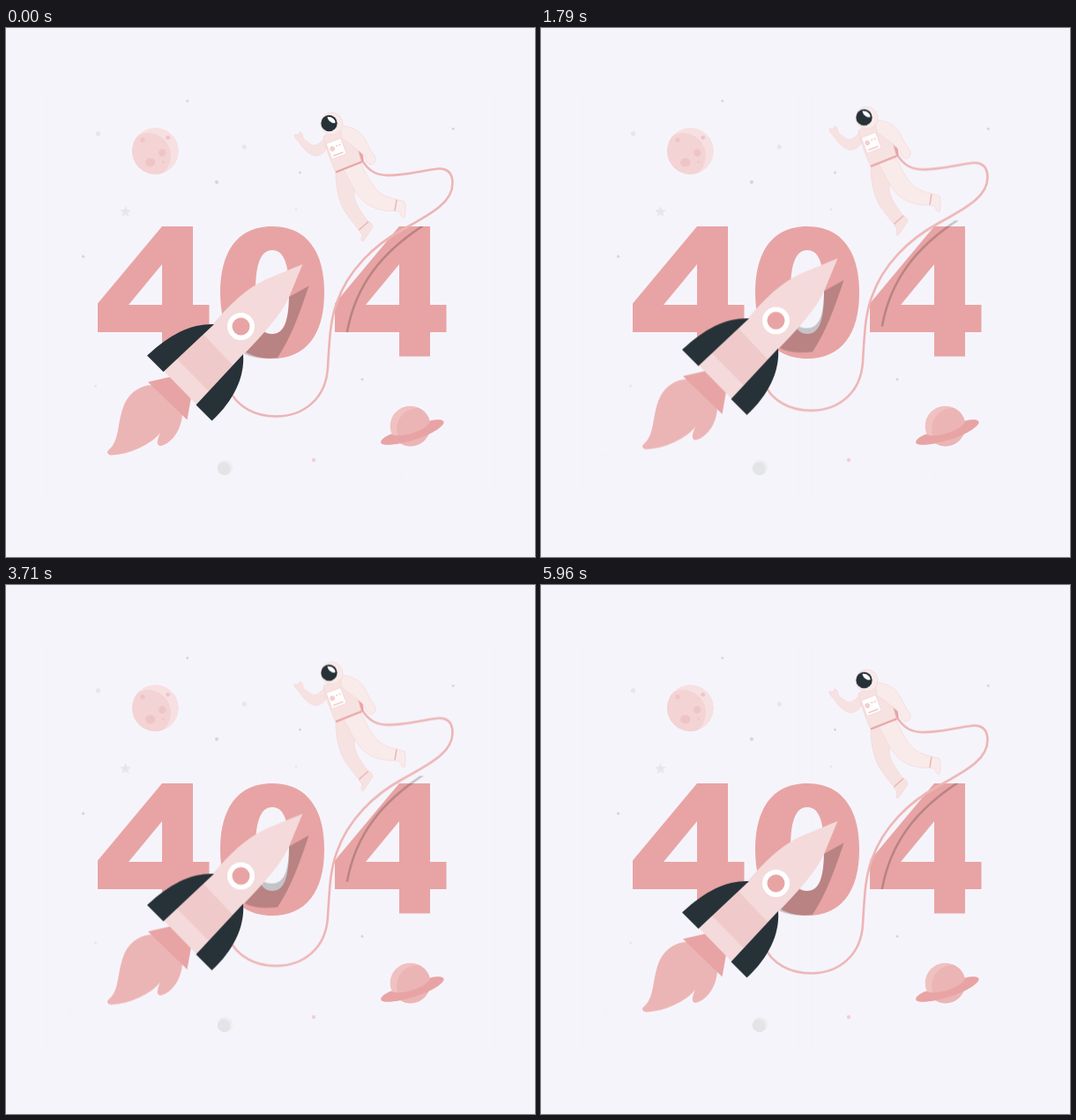
Write an HTML page that moves like this. It is 600 px wide and 600 px high and loops after 6 s.

```html
<!DOCTYPE html>
<html lang="en">
<head>
<meta charset="utf-8">
<title>404</title>
<style>
  html, body { margin: 0; width: 100%; height: 100%; overflow: hidden; background: #f6f4fb; }
  svg { display: block; width: 100vw; height: 100vh; }
  .float { animation: float 3s linear infinite alternate; }
  @keyframes float { to { transform: translateY(-11.2px); } }
  .rose { fill: #e8a4a4; }
  .soft { fill: #ecb5b5; }
  .navy { fill: #263238; }
  .shade { opacity: .2; }
  .suit { stroke: #f3d6d6; stroke-width: .7; stroke-linejoin: round; }
  .near { fill: #faebeb; }
  .far { fill: #f7e2e2; }
  .line { fill: none; stroke: #e8a4a4; }
</style>
</head>
<body>
<svg viewBox="0 0 600 600">
  <defs>
    <path id="four" fill-rule="evenodd" d="M177 225H212V314H230.500V345H212V372.500H177V345H104V312.500ZM177 268L139 314H177Z"/>
    <clipPath id="moon"><circle cx="169.500" cy="139.500" r="26.500"/></clipPath>
    <clipPath id="globe"><circle cx="458.500" cy="451.500" r="23"/></clipPath>
    <clipPath id="pebble"><circle cx="248.500" cy="498.500" r="9"/></clipPath>
    <clipPath id="band"><rect x="370" y="225" width="120" height="120"/></clipPath>
  </defs>

  <!-- sky -->
  <path d="M46.500 70V530M292.500 70V530M307.500 70V530M553.500 70V530" fill="none" stroke="#f4f2f9"/>
  <g fill="#e8e6ec">
    <circle cx="104.500" cy="119.700" r="2.700"/>
    <circle cx="270.300" cy="135" r="2.700"/>
    <circle cx="101.500" cy="406" r="1.500"/>
    <circle cx="329" cy="206" r="1.400"/>
    <path d="M135.500 201.700l1.800 4.300 4.700.4-3.600 3 1.100 4.600-4-2.500-4 2.500 1.100-4.600-3.600-3 4.700-.4z"/>
  </g>
  <g fill="#d8d3dc">
    <circle cx="205.800" cy="82.800" r="1.500"/>
    <circle cx="239" cy="174.800" r="2.100"/>
    <circle cx="333.500" cy="164" r="1.500"/>
    <circle cx="507.200" cy="114.300" r="1.500"/>
    <circle cx="87.600" cy="259.200" r="1.600"/>
    <circle cx="404" cy="398.400" r="1.500"/>
  </g>
  <circle cx="349" cy="490" r="2.200" fill="#f0d0d4"/>
  <g fill="#f5f3f8">
    <circle cx="523.500" cy="392" r="3"/>
    <circle cx="73" cy="485" r="4"/>
    <circle cx="447.500" cy="508" r="3"/>
  </g>

  <g clip-path="url(#moon)">
    <circle cx="169.500" cy="139.500" r="26.500" fill="#f7e0e1"/>
    <circle cx="161" cy="145" r="26" fill="#f3d3d4"/>
    <g fill="#eec5c6">
      <circle cx="155" cy="127" r="2.700"/>
      <circle cx="183.700" cy="124.300" r="2.400"/>
      <circle cx="177.300" cy="141.500" r="4.200"/>
      <ellipse cx="163.700" cy="152.500" rx="5.600" ry="5"/>
      <circle cx="178.500" cy="152" r="1.300"/>
    </g>
  </g>

  <g clip-path="url(#pebble)">
    <circle cx="248.500" cy="498.500" r="9" fill="#eeeef1"/>
    <circle cx="247" cy="500" r="7.400" fill="#e2e4e5"/>
  </g>

  <g clip-path="url(#globe)">
    <circle cx="458.500" cy="451.500" r="23" fill="#f0c1c1"/>
    <circle cx="467" cy="455" r="24" class="soft"/>
  </g>
  <path class="rose" d="M437 460.500C428 464 424 468 425.500 471C428 475 450 472 468 465.500C487 459 498 450 496.500 446.500C495 443.500 488 444 481 445.500C480 451 471 456.500 461 459.500C451 462.500 441 463.500 437 460.500Z"/>

  <!-- digits -->
  <g class="rose">
    <use href="#four"/>
    <use href="#four" x="269"/>
    <path fill-rule="evenodd" d="M302 225C340 225 361 252 361 300S340 375 302 375S243 348 243 300S264 225 302 225ZM302 252C289 252 283 267 283 300S289 347 302 347S321 333 321 300S315 252 302 252Z"/>
  </g>

  <g class="float">
    <!-- shadows cut to the digits' resting outline -->
    <path class="shade" d="M343.500 292.500L321 305C320.600 334 315 347 302 347C296 347 291 345 288 341L262 364L269 369C279 374 292 376 308 374C324 350 334 321 343.500 292.500Z"/>
    <g class="shade" clip-path="url(#band)">
      <path d="M474 223.500C427 254 396 291 386.500 347" fill="none" stroke="#000" stroke-width="2.600"/>
    </g>

    <path d="M252 408C262 431 284 440.500 306 440.500C338 440.500 363 420 365 385C367 350 368 331 375 312C388 274 418 246 450 228.500C488 208 506.500 196 506.500 176C506.500 163 499 158 487 160C465 163 449 168 430 167C417 166 410 160 403 149" fill="none" stroke="#ecb5b5" stroke-width="2.600"/>

    <!-- rocket -->
    <path class="soft" d="M116 479C130 468 125 447 135 425C142 411 155 404 169 405L200 436C200 453 190 470 176 474C170 474 171 468 175 459C165 472 140 484 119 484.500C115 484 114 481 116 479Z"/>
    <path class="rose" d="M161 401.500L187 395.500L210 419L205.500 444.500Z"/>
    <path fill="#f4dada" d="M178 388L235 335.500C254 314 271 296 295 285C310 279 323 273 336.500 268C331 281 326 293 321 305.500C311 327 290 349 269 371L216 427Z"/>
    <path fill="#f0caca" d="M193 374.500L223 346.500L257.500 383L230 412Z"/>
    <path class="navy" d="M160 371.500C187 346 212 335 236 336L178.500 390Z"/>
    <path class="navy" d="M269 370C271 396 258 423 233.500 445.500L215.500 427.500Z"/>
    <circle cx="266.500" cy="338.500" r="15.500" fill="#fff"/>
    <circle cx="266.500" cy="338.500" r="10" class="rose"/>

    <!-- astronaut -->
    <path class="rose" d="M392 130C401 132 406 142 405.500 151L401 155Z"/>
    <path class="suit far" d="M361 122L360 127C355 131 352 134 348 133C344 131 340 128 337 125C337 121 335 118 333 118L332 121L327 121C327 125 330 127 332 129C337 137 343 143 350 145C356 145 360 142 363 138Z"/>
    <path class="suit far" d="M374 164C374 183 379 202 387 212C392 219 397 225 401 230L411 220C403 209 396 200 395 190C395 180 398 174 397 158Z"/>
    <path class="suit far" d="M400 229L411.500 219.500C414 221 416 223 416 226C412 231 410 236 405 242C402 242 403 238 404 235Z"/>
    <path class="suit near" d="M383 161L402 153C409 166 414 178 423 186C429 191 437 193 443 194.500L441 207.500C425 208 411 203 403 194C394 184 391 174 383 161Z"/>
    <path class="suit near" d="M441 207.500L443 194.500L452 197C454 203 453 210 452 215C449 215 448 212 446 208Z"/>
    <path class="suit far" d="M360 123C366 119 374 115 382 113C395 122 399 137 403 152L374 164C368 151 363 137 360 123Z"/>
    <path class="suit near" d="M379 111C392 111 402 117 407 126C411 134 414 140 418 145C421 151 418 155 413 155C409 153 407 149 408 146C401 140 390 131 381 125Z"/>
    <path class="line" stroke-width="2" d="M374 163.500L403 152"/>
    <path class="line" stroke-width="1.500" opacity=".7" d="M400.500 229L411 219.500M441 207L443 195"/>
    <g transform="rotate(-21 374.500 137)">
      <rect x="366" y="127.500" width="17.500" height="19" rx="1" fill="#fff" stroke="#f0caca" stroke-width=".6"/>
      <circle cx="370.500" cy="135.500" r="2.900" fill="#f3cfcf"/>
      <path class="line" stroke-width="1.300" opacity=".7" d="M375.500 134H377.500M379 134H381M368.500 143.500H380.500"/>
    </g>
    <circle class="suit near" cx="369.500" cy="108.500" r="12.500"/>
    <circle class="navy" cx="366.500" cy="108" r="9.200"/>
    <path fill="#fff" d="M364.500 101C369 100 374 104 373.500 107.500C370 109 365 105 364.500 101Z"/>
  </g>
</svg>
</body>
</html>
```
